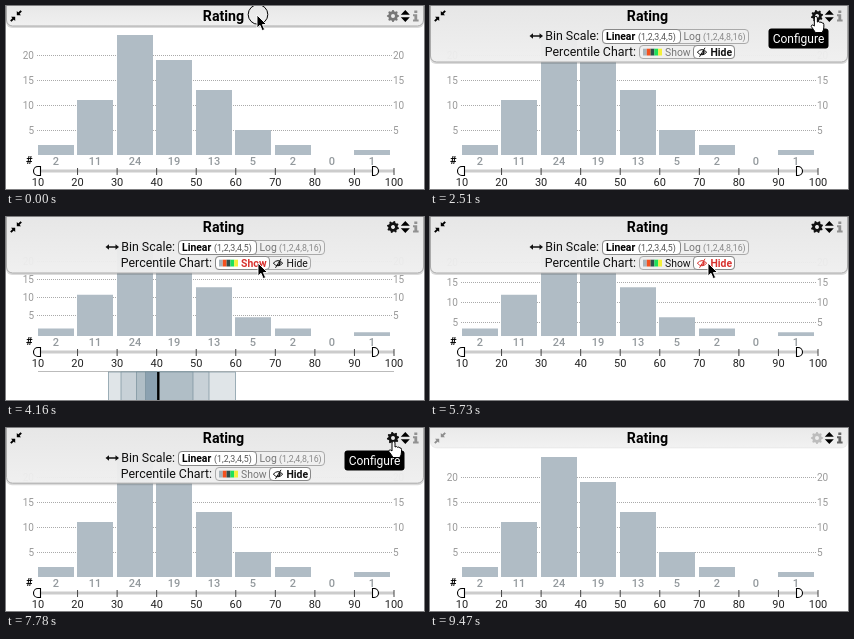
An HTML page that plays this animation: 418 px wide and 183 px high, repeating every 9570 ms.

```html
<!DOCTYPE html>
<html lang="en">
<head>
<meta charset="utf-8">
<title>Rating histogram</title>
<style>
  html, body { margin: 0; width: 100%; height: 100%; overflow: hidden; background: #fff; }
  svg { display: block; width: 100vw; height: 100vh; font-family: Roboto, Arial, sans-serif; }
  .tick { font-size: 11px; fill: #222; text-anchor: middle; }
  .grid { font-size: 10px; fill: #999; }
  .count { font-size: 11px; font-weight: 500; fill: #93999d; text-anchor: middle; }
  .label { font-size: 12.4px; fill: #111; text-anchor: end; }
  .btn { font-size: 10.4px; }
  .small { font-size: 8.8px; font-weight: 400; }
  .b { font-weight: 700; }
</style>
</head>
<body>
<svg viewBox="0 0 418 183">
  <defs>
    <linearGradient id="shade" x1="0" y1="0" x2="0" y2="1">
      <stop offset="0" stop-color="#e6e6e6"/><stop offset="1" stop-color="#f1f1f1"/>
    </linearGradient>
    <clipPath id="clip"><rect id="clipBox" width="418" height="20"/></clipPath>
  </defs>

  <g id="grid"></g>
  <g id="bars" fill="#b0bcc5"></g>
  <g id="axis">
    <text x="20" y="158" class="b" font-size="11">#</text>
    <path d="M32 165H388" stroke="#ccc" stroke-width="3"/>
  </g>
  <g id="box" stroke="#78909c" stroke-width=".7">
    <path d="M32 154.500H388" stroke="#bbb" stroke-width="1"/>
    <rect x="102.500" y="155" width="127" height="30" fill="#e0e5e8"/>
    <rect x="115" y="155" width="88" height="30" fill="#c8d1d7"/>
    <rect x="130.500" y="155" width="56.500" height="30" fill="#b0bec6"/>
    <rect x="139.500" y="155" width="12" height="30" fill="#8ba1b0"/>
    <path d="M152.300 155V184" stroke="#000" stroke-width="2.400"/>
  </g>

  <rect id="shadow" x="0" y="-6" width="418" rx="6" fill="#000" opacity=".12"/>
  <rect id="panel" x=".5" y="-6" width="417" rx="6" fill="url(#shade)" fill-opacity=".95" stroke="#aaa"/>
  <g clip-path="url(#clip)">
    <path d="M99.500 30L103 27.200V29.300H109.500V27.200L113 30L109.500 32.800V30.700H103V32.800Z" fill="#111"/>
    <text x="169" y="34" class="label">Bin Scale:</text>
    <text x="206" y="50" class="label">Percentile Chart:</text>
    <rect x="172.500" y="23.500" width="146" height="14" rx="3.500" fill="#f0f0f0" stroke="#aaa"/>
    <rect x="172.500" y="23.500" width="78" height="14" rx="3.500" fill="#fff" stroke="#888"/>
    <text x="176" y="34" class="btn b">Linear</text>
    <text x="208" y="34" class="small" fill="#555">(1,2,3,4,5)</text>
    <text x="253.500" y="34" class="btn" fill="#777">Log</text>
    <text x="273" y="34" class="small" fill="#888">(1,2,4,8,16)</text>
    <rect x="209.500" y="39.500" width="95" height="13" rx="3.500" fill="#f0f0f0" stroke="#aaa"/>
    <rect id="active" y="39.500" height="13" rx="3.500" fill="#fff" stroke="#888"/>
    <g id="swatch"></g>
    <text id="show" x="235" y="50" class="btn">Show</text>
    <g id="eye" fill="none">
      <path d="M267.300 46.200Q272 41 276.700 46.200Q272 51.400 267.300 46.200ZM275 41.800L269.500 50.800"/>
      <path d="M273.300 44.500Q275 46.500 272.300 48.500" stroke-width="1.500"/>
    </g>
    <text id="hide" x="280.500" y="50" class="btn">Hide</text>
  </g>

  <text x="217.500" y="15" class="b" font-size="14.200" text-anchor="middle">Rating</text>
  <g id="collapse" stroke="#000" stroke-width="1.900">
    <path d="M4.800 15.200L8 12M15.200 4.800L12 8"/>
    <path d="M5 10.800H9.200V15ZM10.800 5V9.200H15Z" stroke="none"/>
  </g>
  <path id="gear" fill-rule="evenodd"/>
  <path d="M394.800 8.800L399.300 4L403.800 8.800ZM394.800 11.300L399.300 16.100L403.800 11.300Z"/>
  <path id="info" d="M408.300 4.500h3v2.600h-3zM407 8.300h4.200v5.200h1.400v1.900h-5.600v-1.900h1.400v-3.300h-1.400z"/>

  <g id="tip">
    <rect x="338.500" y="22.500" width="60" height="20" rx="3"/>
    <text x="368.500" y="36.500" font-size="12" fill="#fff" text-anchor="middle">Configure</text>
  </g>
  <circle id="ring" r="9.800" fill="none" stroke="#000"/>
  <path id="arrow" d="M0 0V13L3 10.300L5.200 15.600L7.600 14.600L5.400 9.500H9.500Z" stroke="#fff" stroke-width=".9"/>
  <path id="hand" d="M-1.500 8V1Q-1.500-.7 0-.7T1.500 1V5Q3 3.800 4 5.300Q5.500 4.300 6.300 6Q8 5.500 8 7.500V10Q8 13 6.300 15.500H-.5Q-2.500 12-4.600 9.500Q-4.300 6.500-1.500 9Z"
    fill="#fff" stroke="#000"/>
</svg>

<script>
const LOOP = 9570, STEP = 356 / 9;
const $ = id => document.getElementById(id);
const set = (el, attrs) => { for (const k in attrs) el.setAttribute(k, attrs[k]); return el; };
const add = (parent, tag, attrs, text) => {
  const el = set(document.createElementNS('http://www.w3.org/2000/svg', tag), attrs);
  if (text !== undefined) el.textContent = text;
  return parent.appendChild(el);
};
const ease = (t, from, to) => {
  const p = Math.min(1, Math.max(0, (t - from) / (to - from)));
  return p * p * (3 - 2 * p);
};
const between = (t, a, b) => t >= a && t < b;

const counts = [2, 11, 24, 19, 13, 5, 2, 0, 1];
const bars = counts.map((n, i) => {
  const x = Math.round(31.6 + i * STEP);
  add($('axis'), 'text', { class: 'count', x: x + 18, y: 159 }, n);
  return add($('bars'), 'rect', { x, width: 36 });
});
for (let i = 0; i < 10; i++) {
  const x = 32 + i * STEP;
  add($('axis'), 'path', { d: `M${x} 162V169`, stroke: '#444' });
  add($('axis'), 'text', { class: 'tick', x, y: 180 }, 10 + i * 10);
}
for (const d of ['M34.500 160.500V169.500H32A4.500 4.500 0 0 1 32 160.500Z', 'M366.500 160.500V169.500H368A4.500 4.500 0 0 0 368 160.500Z'])
  add($('axis'), 'path', { d, fill: '#fff', stroke: '#000', 'stroke-width': 1.1 });

const lines = [5, 10, 15, 20].map(v => {
  const g = add($('grid'), 'g', {});
  add(g, 'path', { d: 'M31 .5H386', stroke: '#aaa', 'stroke-dasharray': '1 1' });
  add(g, 'text', { class: 'grid', x: 28, y: 3.5, 'text-anchor': 'end' }, v);
  add(g, 'text', { class: 'grid', x: 387, y: 3.5 }, v);
  return { v, g };
});

['#a9b4ba', '#f4511e', '#2f4f4a', '#1ee05a', '#f4f03a'].forEach((fill, i) =>
  add($('swatch'), 'rect', { x: 213 + i * 3.8, y: 42.7, width: 3.8, height: 6.8, fill }));

// Cog outline: eight teeth around a round hole.
let cog = '';
for (let i = 0; i < 32; i++) {
  const a = (i - .5) * Math.PI / 16, r = i % 4 < 2 ? 6.1 : 4.7;
  cog += (i ? 'L' : 'M') + (r * Math.cos(a)).toFixed(2) + ' ' + (r * Math.sin(a)).toFixed(2);
}
set($('gear'), { d: cog + 'ZM2 0A2 2 0 1 0 -2 0A2 2 0 1 0 2 0Z' });

// Pointer moves: start, end, x, y
const moves = [
  [500, 1080, 386, 11], [2500, 3060, 252, 46], [4600, 5120, 278, 46],
  [6640, 7180, 387.5, 14], [8920, 9470, 399, 158]
];
const clicks = [0, 1770, 3570, 5610, 7670];

function pointer(t) {
  let x = 251, y = 9;
  for (const [a, b, tx, ty] of moves) {
    const p = ease(t, a, b);
    x += (tx - x) * p;
    y += (ty - y) * p;
  }
  return [x, y];
}

function draw(t) {
  const [x, y] = pointer(t);
  const open = ease(t, 1790, 2300) - ease(t, 7730, 8300);
  const isOpen = between(t, 1830, 8300);
  const leave = ease(t, 9080, 9460);
  const onGear = x > 380 && x < 394 && y < 18;

  // Bars and axis follow the plot height; grid lines react slightly sooner.
  const rise = ease(t, 3640, 4040) - ease(t, 5725, 6180);
  const gridRise = ease(t, 3640, 4040) - ease(t, 5615, 5945);
  const base = 149 - 30 * rise, unit = 5 - 1.25 * rise;
  bars.forEach((bar, i) => set(bar, { y: base - counts[i] * unit, height: counts[i] * unit }));
  set($('axis'), { transform: `translate(0 ${-30 * rise})` });
  for (const { v, g } of lines)
    set(g, { transform: `translate(0 ${Math.round(149 - 33 * gridRise - v * (5 - 1.375 * gridRise))})` });
  set($('box'), { opacity: t < 5665 ? ease(t, 3700, 4000) : 0 });

  const h = 20 + 36 * open;
  set($('panel'), { height: h + 6, 'stroke-opacity': 1 - .85 * leave });
  set($('shadow'), { height: h + 8, opacity: .14 * (1 - leave) });
  set($('clipBox'), { height: h });

  const inRow = y > 39 && y < 53;
  const overShow = inRow && x > 210 && x < 264, overHide = inRow && x >= 264 && x < 304;
  const shown = between(t, 3570, 5610);
  const ink = (over, on) => over ? '#d8322f' : on || overShow || overHide ? '#111' : '#777';
  set($('active'), shown ? { x: 209.5, width: 54 } : { x: 263.5, width: 41 });
  set($('show'), { fill: ink(overShow, shown), 'font-weight': shown ? 700 : 400 });
  set($('hide'), { fill: ink(overHide, !shown), 'font-weight': shown ? 400 : 700 });
  set($('eye'), { stroke: ink(overHide, !shown) });

  const grey = 119 + 70 * leave;
  set($('gear'), {
    transform: `translate(387 10) rotate(${isOpen ? (t - 1830) * .18 : 0})`,
    fill: isOpen ? '#111' : onGear ? '#e0403c' : `rgb(${grey},${grey},${grey})`
  });
  set($('collapse'), { opacity: 1 - .6 * leave });
  const tone = 145 - 45 * leave;
  set($('info'), { fill: `rgb(${tone},${tone},${tone})` });

  const tip = ease(t, 1080, 1290) - ease(t, 2560, 2740) + ease(t, 7180, 7390) - ease(t, 8980, 9160);
  set($('tip'), { opacity: tip });

  const at = `translate(${x} ${y})`, visible = t < 9470;
  set($('ring'), { transform: `translate(${x + 1} ${y - .5})`, opacity: clicks.some(c => between(t, c, c + 60)) ? 1 : 0 });
  set($('arrow'), { transform: at, opacity: visible && !onGear ? 1 : 0 });
  set($('hand'), { transform: at, opacity: visible && onGear ? 1 : 0 });
}

const start = performance.now();
function tick() {
  draw((performance.now() - start) % LOOP);
  requestAnimationFrame(tick);
}
tick();
</script>
</body>
</html>
```
